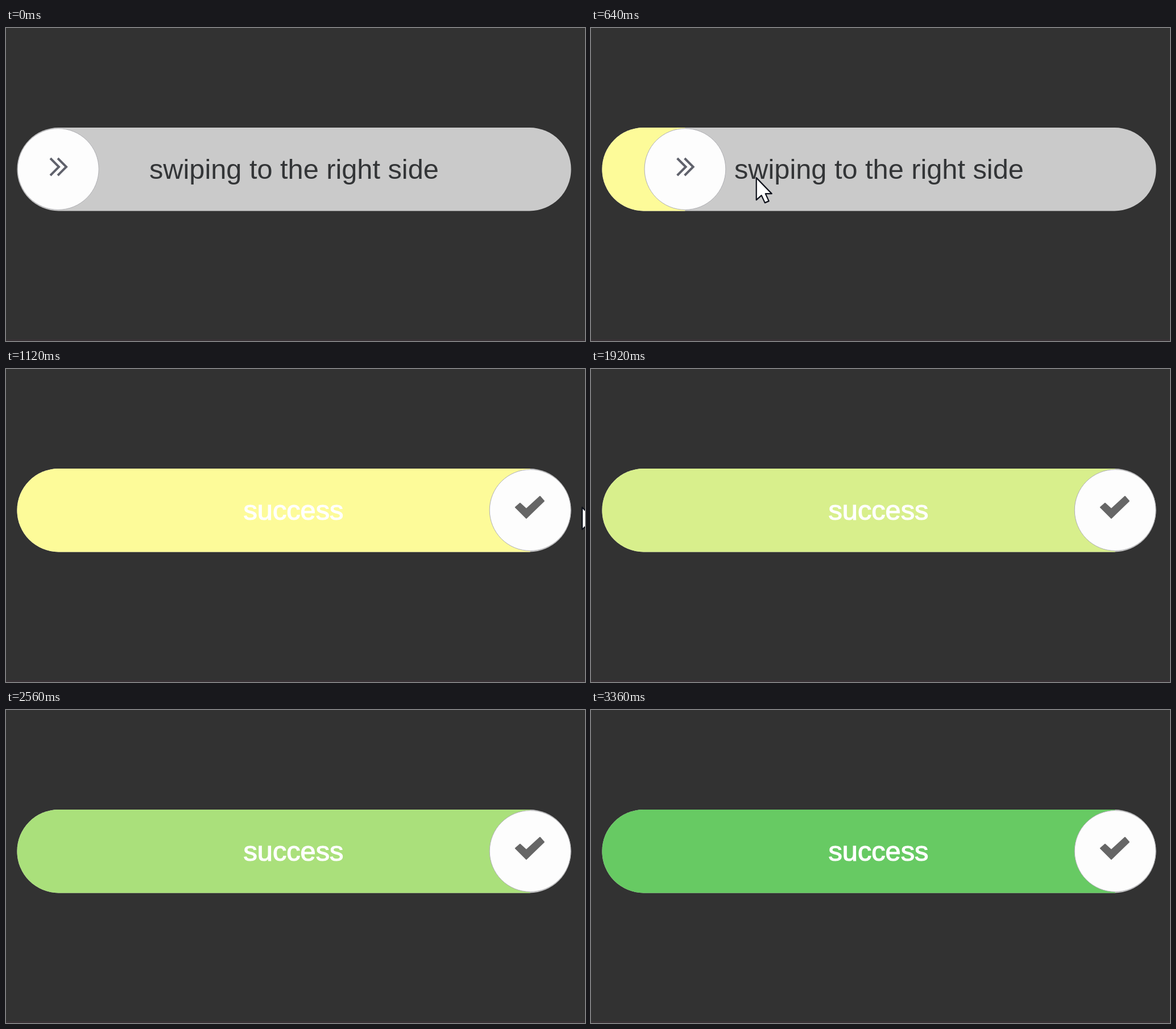
Write an HTML page that moves like this. It is 1018x550 px and loops after 3520 ms.

```html
<!DOCTYPE html>
<html lang="en">
<head>
<meta charset="utf-8">
<title>Swipe slider</title>
<style>
  html, body { margin: 0; width: 100%; height: 100%; overflow: hidden; background: #323232; }
  svg { display: block; }
  text { font: 48.7px "Liberation Sans", Arial, sans-serif; }
</style>
</head>
<body>
<svg width="1018" height="550" viewBox="0 0 1018 550">
  <clipPath id="pill"><rect x="19.5" y="175" width="974" height="146.4" rx="73"/></clipPath>
  <rect width="1018" height="550" fill="#323232"/>
  <rect y="547" width="1018" height="3" fill="#393236"/>
  <g clip-path="url(#pill)">
    <rect x="19" y="175" width="975" height="147" fill="#cacaca"/>
    <rect id="fill" x="19" y="175" height="147"/>
  </g>
  <text id="hint" x="252" y="265" fill="#333537">swiping to the right side</text>
  <text id="done" x="417.5" y="265" fill="#fff" stroke="#fff" stroke-width="1.2">success</text>
  <g id="knob">
    <circle cx="91.8" cy="248" r="71.4" fill="#fdfdfd" stroke="#b0b0b4"/>
    <path id="arrows" d="M78 229l15 15-15 15M91 229l15 15-15 15" fill="none" stroke="#60626c" stroke-width="4"/>
    <path id="check" d="M66 243l8-7 11 10 24-22 7 8-31 30z" fill="#666" stroke="#666" stroke-width="2" stroke-linejoin="round"/>
  </g>
  <path id="cursor" d="M0 0v39l9-8 6 13 7-3-6-13h11z" fill="#fff" stroke="#10131c" stroke-width="2.2" stroke-linejoin="round"/>
</svg>
<script>
const LOOP = 3520, STEP = 160, APPEAR = 160, PRESS = 480, DONE = 1120, GONE = 1280;
const TRAVEL = 829.8, YELLOW = [253, 251, 153], GREEN = [103, 202, 99];
const $ = id => document.getElementById(id);

const progress = (t, from, to) => Math.min(1, Math.max(0, (t - from) / (to - from)));
// Symmetric ease-in-out; a larger k gives a steeper middle.
const ease = (p, k) => p ** k / (p ** k + (1 - p) ** k);
const show = (id, on) => $(id).setAttribute("visibility", on ? "visible" : "hidden");
const move = (id, x, y) => $(id).setAttribute("transform", `translate(${x} ${y})`);

function draw(t) {
  const x = TRAVEL * ease(progress(t, PRESS, DONE), 2.12);
  const approach = ease(progress(t, APPEAR, 400), 2);
  const sweep = ease(progress(t, PRESS, 1000), 1.75);
  const tint = progress(t, DONE, LOOP - STEP) ** 1.35;
  const success = t >= DONE;

  move("knob", x, 0);
  move("cursor", 75 + 41 * approach + 897 * sweep, 337 - 69 * approach - 25 * sweep);
  $("fill").setAttribute("width", x ? x + 72.7 : 0);
  $("fill").setAttribute("fill", `rgb(${YELLOW.map((c, i) => Math.round(c + (GREEN[i] - c) * tint))})`);
  show("hint", !success);
  show("arrows", !success);
  show("done", success);
  show("check", success);
  show("cursor", t >= APPEAR && t < GONE);
}

const start = performance.now();
function tick() {
  const t = (performance.now() - start) % LOOP;
  draw(Math.floor(t / STEP) * STEP);
  requestAnimationFrame(tick);
}
tick();
</script>
</body>
</html>
```
